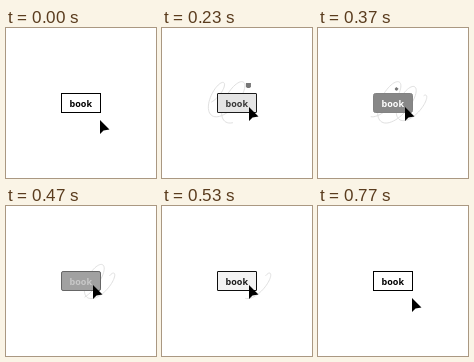
Animation, 150 px wide and 150 px high, one loop 1.36 s. Source, as an HTML page:

```html
<!DOCTYPE html>
<html lang="en">
<head>
<meta charset="utf-8">
<title>Book button</title>
<style>
html, body { margin: 0; width: 100%; height: 100%; overflow: hidden; background: #fff; }
svg { display: block; width: 100vw; height: 100vh; }
text { font: bold 9px "Open Sans", "Noto Sans", sans-serif; text-anchor: middle; }
</style>
</head>
<body>
<svg viewBox="0 0 150 150">
  <path id="scribble" fill="none" stroke="#e0e0e0"/>
  <path id="chip" fill="#777" d="M-2.5-2.5H2.5V1.5L1 2.5H-1L-2.5 1.5Z"/>
  <rect id="box" x="55.5" y="65.5" width="39" height="19"/>
  <text id="label" x="74.8" y="78.8">book</text>
  <path id="cursor" d="M0 0V14L3.5 10.5L9.5 9.5Z"/>
</svg>
<script>
const LOOP = 1360, TURNS = 3.6, STEP = 1 / 200;
const el = id => document.getElementById(id);
const scribble = el('scribble'), chip = el('chip'), box = el('box'), label = el('label'), cursor = el('cursor');

const ramp = (t, from, to) => Math.min(1, Math.max(0, (t - from) / (to - from)));
const ease = p => p * p * (3 - 2 * p);
const pulse = (t, inA, inB, outA, outB) => ease(ramp(t, inA, inB)) * (1 - ease(ramp(t, outA, outB)));
const grey = v => { const n = Math.round(v); return `rgb(${n},${n},${n})`; };

// Slanted loops that travel right, growing and shrinking on the way.
function coil(u) {
  const a = 2 * Math.PI * TURNS * u;
  const size = 10 + 10 * Math.sin(Math.PI * u);
  const x = 46 + 57 * u + size * (0.6 * Math.sin(a) - 0.5 * Math.cos(a));
  const y = 66 + 12 * Math.sin(Math.PI * u / 2) + size * Math.cos(a);
  return `${x.toFixed(2)} ${y.toFixed(2)}`;
}

function stroke(tail, head) {
  if (head <= tail) return '';
  const points = [];
  for (let u = tail; u < head; u += STEP) points.push(coil(u));
  points.push(coil(head));
  return 'M' + points.join('L');
}

function draw(t) {
  const hover = pulse(t, 20, 130, 570, 770);
  cursor.setAttribute('transform', `translate(${94 - 7 * hover} ${92 - 13 * hover})`);

  const press = pulse(t, 180, 350, 435, 555);
  box.setAttribute('fill', grey(255 - 120 * press));
  box.setAttribute('stroke', grey(130 * press));
  box.setAttribute('rx', 2 * press);
  label.setAttribute('fill', grey(255 * press));

  scribble.setAttribute('d', stroke(ramp(t, 150, 570) ** 2, ease(ramp(t, 30, 400))));

  const fall = (t - 230) / 140;
  chip.setAttribute('visibility', t >= 200 && t < 440 ? 'visible' : 'hidden');
  chip.setAttribute('transform', `translate(${86.5 - 8 * fall} ${57.5 + 3.5 * fall}) rotate(${40 * fall}) scale(${1 - 0.4 * fall})`);
}

const start = performance.now();
function tick() {
  draw((performance.now() - start) % LOOP);
  requestAnimationFrame(tick);
}
draw(0);
requestAnimationFrame(tick);
</script>
</body>
</html>
```
